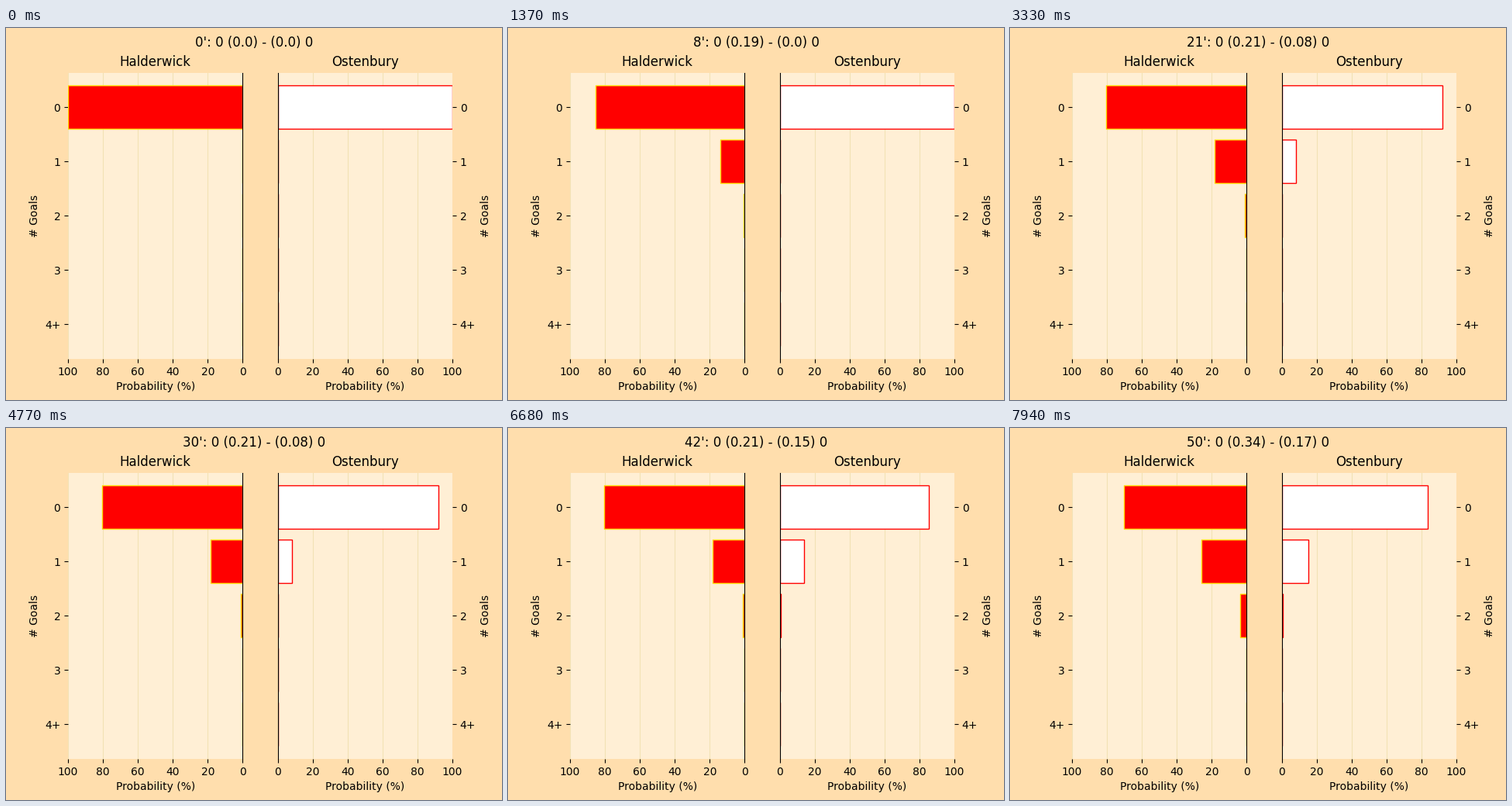
A matplotlib script for the animation above (8 s loop, 640x480 px).

```python
import numpy as np
import matplotlib.pyplot as plt
from matplotlib.animation import FuncAnimation

plt.rcParams["font.family"] = "DejaVu Sans"

LOOP, TICK = 8000, 20        # ms
HOLD, STEP, STEPS = 160, 30, 5

# minute -> shots as (team, chance of scoring)
SHOTS = {
    8: [(0, 0.121), (0, 0.071)],
    11: [(0, 0.0158)],
    16: [(1, 0.08)],
    41: [(1, 0.072)],
    44: [(0, 0.0433)],
    45: [(0, 0.0868), (1, 0.019)],
}
LAST_MINUTE = 50
TEAMS = [("Halderwick", "red", "gold"), ("Ostenbury", "white", "red")]


def goal_odds(chances):
    """Percent chance of 0, 1, 2, 3 and 4+ goals from independent shots."""
    odds = np.ones(1)
    for p in chances:
        odds = np.convolve(odds, [1 - p, p])
    odds = np.pad(odds, (0, 5))
    return 100 * np.append(odds[:4], odds[4:].sum())


def build_timeline():
    """List of (start ms, title, bar widths of both teams)."""
    taken = [[], []]
    odds = np.array([goal_odds(c) for c in taken])
    states, t = [], 0
    for minute in range(LAST_MINUTE + 1):
        shots = SHOTS.get(minute, [])
        for team, p in shots:
            taken[team].append(p)
        home, away = (round(float(sum(c)), 2) for c in taken)
        title = f"{minute}': 0 ({home}) - ({away}) 0"
        target = np.array([goal_odds(c) for c in taken])
        if shots:
            for k in range(1, STEPS + 1):
                states.append((t, title, odds + (target - odds) * k / STEPS))
                t += STEP
        else:
            states.append((t, title, target))
            t += HOLD
        odds = target
    return states


def style(ax, team, side):
    name, face, edge = team
    inner = "right" if side == "left" else "left"
    ax.set_title(name)
    ax.set_facecolor("papayawhip")
    ax.set_axisbelow(True)
    ax.grid(axis="x", color="#f2e2b4")
    for key, spine in ax.spines.items():
        spine.set_visible(key == inner)
    bars = ax.barh(range(5), [100, 0, 0, 0, 0], color=face, edgecolor=edge)
    ax.set_xlim((100, 0) if side == "left" else (0, 100))
    ax.set_ylim(4.64, -0.64)
    ax.set_xticks(range(0, 101, 20))
    ax.set_yticks(range(5), ["0", "1", "2", "3", "4+"])
    ax.yaxis.set_ticks_position(side)
    ax.yaxis.set_label_position(side)
    ax.set_xlabel("Probability (%)")
    ax.set_ylabel("# Goals")
    return bars


fig, axes = plt.subplots(1, 2, figsize=(6.4, 4.8), dpi=100,
                         facecolor="navajowhite")
charts = [style(ax, team, side)
          for ax, team, side in zip(axes, TEAMS, ("left", "right"))]
heading = fig.suptitle("")

timeline = build_timeline()
starts = [s[0] for s in timeline]


def update(i):
    t = i * TICK + TICK / 2
    _, title, widths = timeline[np.searchsorted(starts, t, side="right") - 1]
    heading.set_text(title)
    for bars, row in zip(charts, widths):
        for bar, w in zip(bars, row):
            bar.set_width(w)
    return [heading]


anim = FuncAnimation(fig, update, frames=LOOP // TICK, interval=TICK,
                     repeat=True, repeat_delay=0, blit=False)
plt.show()
```
